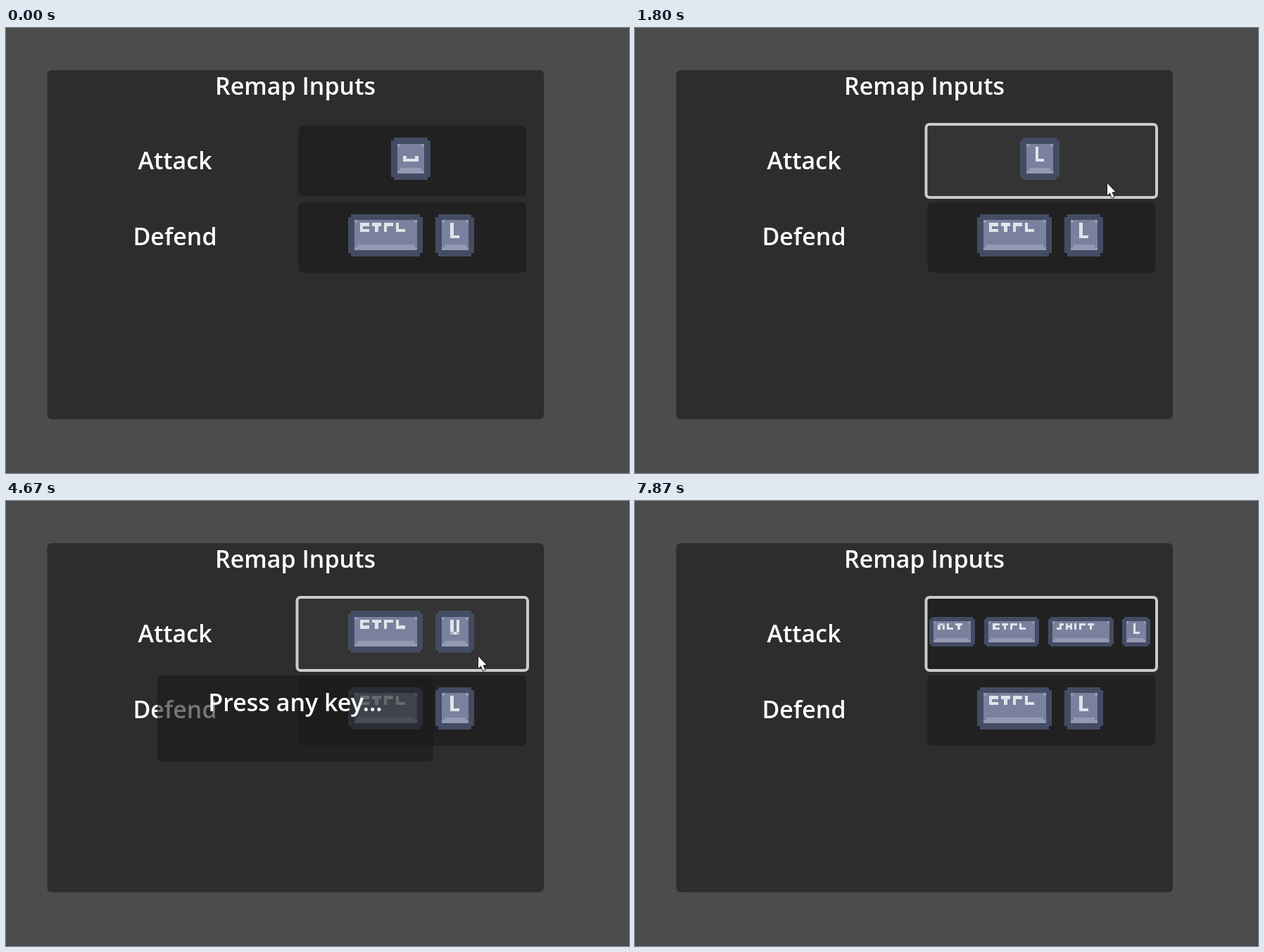
An HTML page with a canvas for the animation above (8 s loop, 885 by 633 pixels).

```html
<!DOCTYPE html>
<html lang="en">
<head>
<meta charset="utf-8">
<title>Remap Inputs</title>
<style>
html, body { margin: 0; width: 100%; height: 100%; overflow: hidden; background: #4c4c4c; }
canvas { display: block; }
</style>
</head>
<body>
<canvas id="stage" width="885" height="633"></canvas>
<script>
const ctx = document.getElementById('stage').getContext('2d');
const LOOP = 8000;
const STEP = 1000 / 15;

const EDGE = '#434c62', FACE = '#7a819e', SHELF = '#9499b4';
const INK = { '1': '#dde5e9', h: '#adb4c7' };
const BUTTON = { normal: 'rgba(25,25,25,.6)', hover: 'rgba(57,57,57,.6)', pressed: 'rgba(0,0,0,.6)' };

// Glyph rows: 1 = bright, h = half tone
const GLYPHS = {
  A: ['h1h', '1.1', '1.1'],
  C: ['111', '1..', '111'],
  F: ['111', '1..', '1..'],
  H: ['1.1', '111', '1.1'],
  I: ['1', '1', '1'],
  L: ['1..', '1..', '111'],
  R: ['111', '1..', '1..'],
  S: ['.11', '.1.', '11.'],
  T: ['111', '.1.', '.1.']
};
const TALL = {
  L: ['1..', '1..', '1..', '1..', '111'],
  V: ['1.1', '1.1', '1.1', '1.1', 'h1h']
};
const SPACE = ['1...1', '11111'];
const KEY_COLS = { ALT: 21, CTRL: 25, SHIFT: 30 };

const ROWS = [{ label: 'Attack', y: 139, base: 200.5 }, { label: 'Defend', y: 248, base: 309 }];
const DEFEND = [['CTRL', 486], ['L', 610]];

function box(x, y, w, h, r, color) {
  ctx.fillStyle = color;
  ctx.beginPath();
  ctx.roundRect(x, y, w, h, r);
  ctx.fill();
}

function label(text, x, y) {
  ctx.font = '600 34px "Open Sans", "Noto Sans", sans-serif';
  ctx.textAlign = 'center';
  ctx.fillStyle = '#fff';
  ctx.fillText(text, x, y);
}

function drawKey(name, x, y, ux, uy) {
  const cols = KEY_COLS[name] || 13;
  const cell = (c, r, w, h, color) => {
    const x0 = Math.round(x + c * ux), y0 = Math.round(y + r * uy);
    ctx.fillStyle = color;
    ctx.fillRect(x0, y0, Math.round(x + (c + w) * ux) - x0, Math.round(y + (r + h) * uy) - y0);
  };
  const glyph = (rows, c, r) => rows.forEach((row, j) =>
    [...row].forEach((p, i) => { if (INK[p]) cell(c + i, r + j, 1, 1, INK[p]); }));

  cell(0, 1, cols, 12, EDGE);
  cell(1, 0, cols - 2, 14, EDGE);
  cell(2, 2, cols - 4, 10, FACE);
  cell(2, 2, 1, 1, SHELF);
  cell(cols - 3, 2, 1, 1, SHELF);
  cell(3, 10, cols - 6, 1, SHELF);
  cell(2, 11, cols - 4, 1, SHELF);

  if (name === 'SPACE') glyph(SPACE, 4, 6);
  else if (TALL[name]) glyph(TALL[name], 5, 3);
  else {
    let c = 4;
    for (const ch of name) {
      glyph(GLYPHS[ch], c, 3);
      c += GLYPHS[ch][0].length + 1;
    }
  }
}

function drawKeys(keys, y, ux, uy) {
  for (const [name, x] of keys) drawKey(name, x, y, ux, uy);
}

function drawAttackKeys(t) {
  if (t < 1800) drawKeys([['SPACE', 547]], 156, 4.3, 4.29);
  else if (t < 4000) drawKeys([['L', 547]], 156, 4.3, 4.29);
  else if (t < 6800) drawKeys([['CTRL', 486], ['V', 610]], 156, 4.25, 4.29);
  else drawKeys([['ALT', 418], ['CTRL', 496], ['SHIFT', 587], ['L', 692]], 165, 3.11, 3);
}

// The pointer slows into the first button and later drops off the panel
function pointer(t) {
  const k = Math.floor((t + 4) / STEP);
  if (k < 2 || k > 117) return null;
  if (k < 7) {
    const p = (7 - k) / 5;
    return { x: 671 + 12 * p, y: 221 + 190 * p ** 1.6 };
  }
  const p = Math.max(0, (k - 114) / 3);
  return { x: 671 - 12 * p, y: 221 + 305 * p ** 1.5 };
}

function drawPointer({ x, y }) {
  const pts = [[0, 0], [0, 17], [3.7, 13.6], [6.6, 20.4], [9.4, 19.2], [6.5, 12.6], [11.3, 12.1]];
  ctx.beginPath();
  pts.forEach(([dx, dy]) => ctx.lineTo(x + dx, y + dy));
  ctx.closePath();
  ctx.lineJoin = 'round';
  ctx.lineWidth = 1.6;
  ctx.strokeStyle = '#151515';
  ctx.stroke();
  ctx.fillStyle = '#fff';
  ctx.fill();
}

const within = (t, a, b) => t >= a && t < b;

function draw(t) {
  const mouse = pointer(t);
  const pressed = within(t, 2267, 2330) || within(t, 4597, 4667);
  const dialog = within(t, 730, 1800) || within(t, 2330, 4000) || within(t, 4667, 6800);

  ctx.fillStyle = '#4c4c4c';
  ctx.fillRect(0, 0, 885, 633);
  ctx.fillStyle = '#444';
  ctx.fillRect(884, 0, 1, 633);
  box(58.5, 60, 705.5, 496.5, 6, '#2d2d2d');
  label('Remap Inputs', 411, 94.5);

  ROWS.forEach((row, i) => {
    const over = mouse && mouse.y >= row.y && mouse.y < row.y + 100;
    const state = i === 0 && pressed ? 'pressed' : over ? 'hover' : 'normal';
    box(415.5, row.y, 323.5, 100, 6, BUTTON[state]);
    label(row.label, 240, row.base);
  });

  if (t >= 730) {
    ctx.strokeStyle = '#cbcbcb';
    ctx.lineWidth = 4;
    ctx.beginPath();
    ctx.roundRect(413.5, 137, 327.5, 104, 5);
    ctx.stroke();
  }
  drawAttackKeys(t);
  drawKeys(DEFEND, 264.6, 4.25, 4.29);

  if (dialog) {
    box(215, 248, 392, 122.5, 6, 'rgba(25,25,25,.6)');
    label('Press any key...', 411, 298.5);
  }
  if (mouse) drawPointer(mouse);
}

const start = performance.now();
function tick() {
  draw((performance.now() - start) % LOOP);
  requestAnimationFrame(tick);
}
tick();
</script>
</body>
</html>
```
